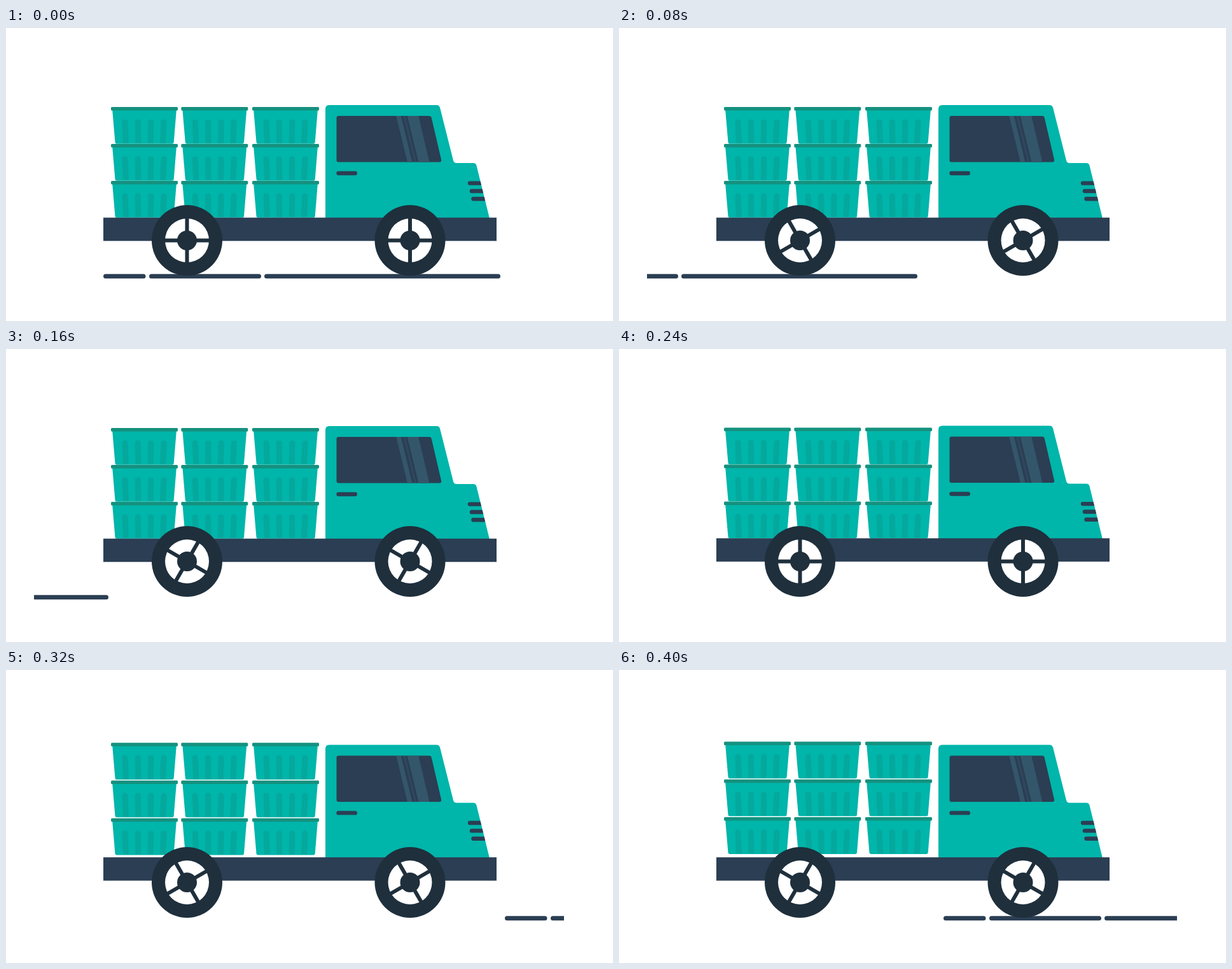
An HTML page for the animation above (0.48 s loop, 954 by 460 pixels).

```html
<!DOCTYPE html>
<html lang="en">
<head>
<meta charset="utf-8">
<title>Truck</title>
<style>
html, body { margin: 0; width: 100%; height: 100%; overflow: hidden; background: #fff; }
svg { display: block; width: 954px; height: 460px; }
</style>
</head>
<body>
<svg viewBox="0 0 954 460">
  <defs>
    <clipPath id="roadClip"><rect x="44" y="380" width="833" height="20"/></clipPath>
    <path id="cabShape" d="M502 299V127q0-6 6-6H676.500q4.500 0 5.600 4.300L703 208q1 4 5 4H734.500q4 0 5 4L760 299Z"/>
    <clipPath id="cabClip"><use href="#cabShape"/></clipPath>
    <path id="glassShape" d="M519.500 141q0-3 3-3H665q3 0 3.700 2.800L684 206.500q1 4-3 4H522.500q-3 0-3-3Z"/>
    <clipPath id="glassClip"><use href="#glassShape"/></clipPath>
    <g id="bin">
      <path d="M2 3H103L98.700 55.500q-.2 2.300-2.500 2.300H9q-2.300 0-2.500-2.300Z" fill="#00b5aa"/>
      <g id="ribs" fill="#05a89d"></g>
      <rect y="0" width="105" height="5.500" rx="1.500" fill="#15917f"/>
    </g>
    <g id="wheel">
      <circle r="55.500" fill="#1f2f3c"/>
      <circle r="34.500" fill="#fff"/>
      <g class="spokes" stroke="#1f2f3c" stroke-width="6"><path d="M-36 0H36M0-36V36"/></g>
      <circle r="15.500" fill="#1f2f3c"/>
    </g>
  </defs>

  <g clip-path="url(#roadClip)">
    <g id="road" stroke="#2b3e53" stroke-width="7" stroke-linecap="round">
      <path d="M156.500 389.800H216M228.500 389.800H397.500M409.500 389.800H773.500"/>
    </g>
  </g>

  <g id="bins"></g>

  <g id="body">
    <use href="#cabShape" fill="#00b5aa"/>
    <use href="#glassShape" fill="#2b3e53"/>
    <g clip-path="url(#glassClip)" fill="#34566a">
      <path d="M613 137H620.500L638.500 211H631Z"/>
      <path d="M624 137H627.500L645.500 211H642Z" opacity=".45"/>
      <path d="M630.500 137H648L665.500 211H648.500Z"/>
    </g>
    <g stroke="#2b3e53" stroke-width="6.400" stroke-linecap="round">
      <path d="M522.500 228H548.700"/>
      <path d="M729 243.600H765M732 256H765M734.500 268.300H765" clip-path="url(#cabClip)"/>
    </g>
    <rect x="153" y="297.700" width="618" height="36.600" fill="#2b3e53"/>
  </g>

  <use href="#wheel" x="284.500" y="333.500"/>
  <use href="#wheel" x="635" y="333.500"/>
</svg>
<script>
const STEP = 80, STEPS = 6;
const NS = 'http://www.w3.org/2000/svg';
const get = id => document.getElementById(id);

function add(parent, tag, attrs) {
  const el = document.createElementNS(NS, tag);
  for (const key in attrs) el.setAttribute(key, attrs[key]);
  return parent.appendChild(el);
}

// Ribs lean slightly inward, like the bin's sides.
[22, 42.300, 62.700, 83].forEach(x => {
  const lean = (52.500 - x) * 0.050;
  add(get('ribs'), 'path', {
    d: `M${x - 4.500} 24q0-4.500 4.500-4.500t4.500 4.500L${x + 4.500 + lean} 57H${x - 4.500 + lean}Z`
  });
});

const rows = [124, 182, 240].map(y => {
  const row = add(get('bins'), 'g', {});
  [165, 275.300, 387].forEach(x => add(row, 'use', { href: '#bin', x, y }));
  return row;
});

const road = get('road'), body = get('body');
const spokes = document.querySelector('.spokes');

// Pose per step: the road passes once a loop, the load hops higher than the body.
const roadShift = [0, -308, -616, -924, 631, 357];
const bodyLift = [0, 0, 0, 0.500, 3.600, 3.600];
const loadLift = [0, 0, 0, 0.500, 7.300, 8.900];
const rowSpread = [0, 0, 0, 0, 1.250, 1.300];

const move = (el, x, y) => el.setAttribute('transform', `translate(${x} ${y})`);

function draw(time) {
  const step = Math.floor(time / STEP) % STEPS;
  move(road, roadShift[step], 0);
  move(body, 0, -bodyLift[step]);
  rows.forEach((row, i) => move(row, 0, -loadLift[step] - (2 - i) * rowSpread[step]));
  spokes.setAttribute('transform', `rotate(${step * 360 / STEPS})`);
}

let start;
function tick(now) {
  start ??= now;
  draw(Math.max(0, now - start));
  requestAnimationFrame(tick);
}
draw(0);
requestAnimationFrame(tick);
</script>
</body>
</html>
```
